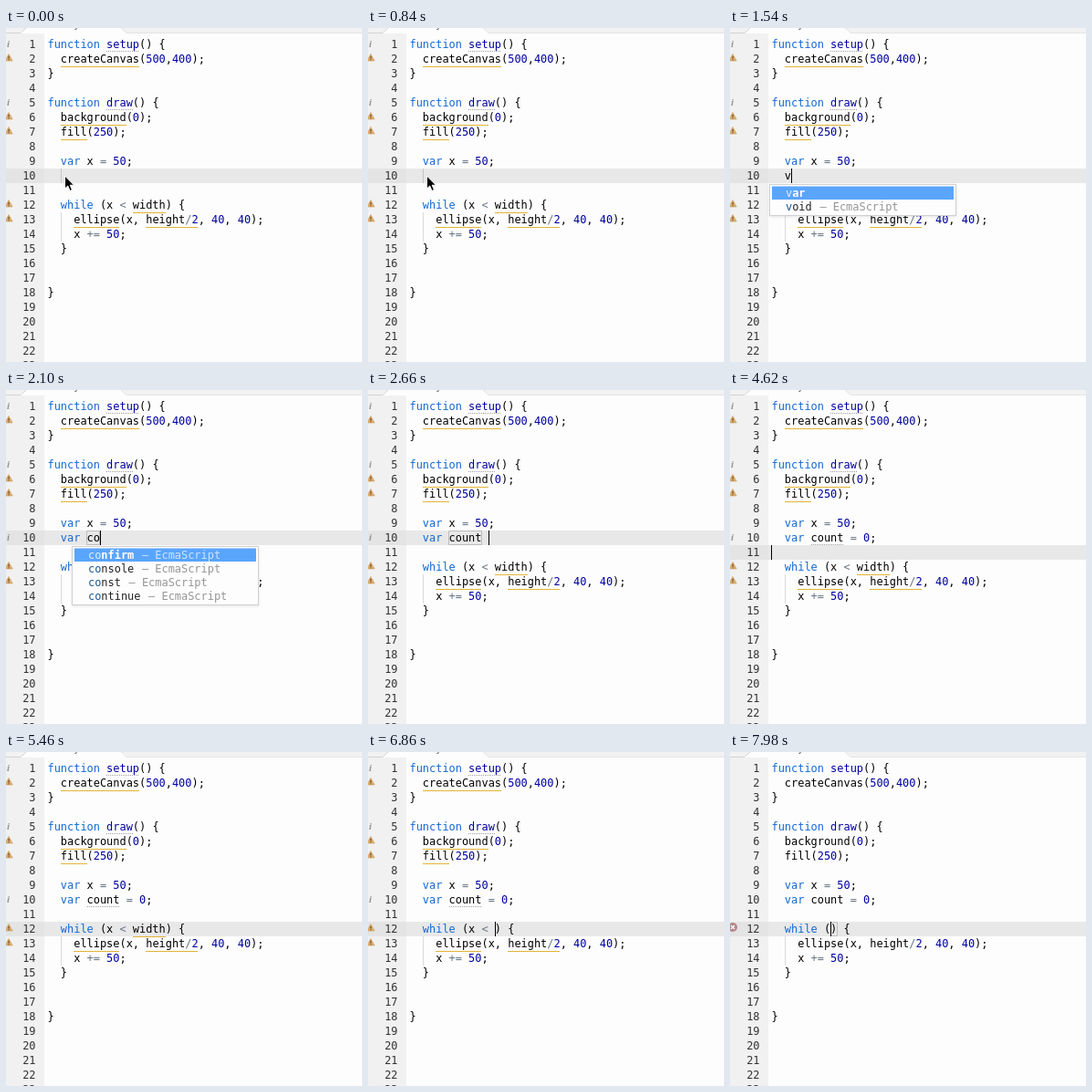
Animation of 390x366 px, one loop 8 s. Source, as an HTML page with a canvas:

```html
<!DOCTYPE html>
<html lang="en">
<head>
<meta charset="utf-8">
<title>Code editor</title>
<style>
  html, body { margin: 0; width: 100%; height: 100%; overflow: hidden; background: #fcfdfc; }
  canvas { display: block; width: 390px; height: 366px; }
</style>
</head>
<body>
<canvas id="stage"></canvas>
<script>
const W = 390, H = 366, LOOP = 8000;
const ADV = 7.18, LEFT = 45.5, TOP = 10, ROW = 16, GUTTER = 42;
const FONT = '11.93px "DejaVu Sans Mono", monospace';
const PAPER = '#fcfdfc';

const canvas = document.getElementById('stage');
const ctx = canvas.getContext('2d');
const ratio = window.devicePixelRatio || 1;
canvas.width = W * ratio;
canvas.height = H * ratio;

const code = [
  'function setup() {',
  '  createCanvas(500,400);',
  '}',
  '',
  'function draw() {',
  '  background(0);',
  '  fill(250);',
  '',
  '  var x = 50;',
  '',
  '',
  '',
  '    ellipse(x, height/2, 40, 40);',
  '    x += 50;',
  '  }',
  '', '',
  '}'
];

// Each step overrides part of the state from its time on.
const start = {
  line10: '  ', cond: 'x < width', row: 10, col: 2, caret: false,
  mouse: true, lint: true, info10: false, error: false,
  box: null, popup: null
};
const decl = (text, more) => ({ line10: '  ' + text, col: 2 + text.length, caret: true, popup: null, ...more });
const cond = (text, more) => ({ cond: text, col: 9 + text.length, caret: true, ...more });
const list = (col, match, items) => ({ col, match, items });
const boxed = n => [10, 6, n];

const steps = [
  [140, { caret: true }],
  [700, { caret: false }],
  [1120, { caret: true }],
  [1260, { caret: false }],
  [1540, decl('v', { mouse: false, popup: list(2, 1, ['var', 'void']) })],
  [1680, decl('va', { popup: list(2, 2, ['var']) })],
  [1820, decl('var ')],
  [1960, decl('var c', { popup: list(6, 1, ['case', 'catch', 'class', 'confirm', 'console', 'const', 'continue']) })],
  [2100, decl('var co', { info10: true, box: boxed(2), popup: list(6, 2, ['confirm', 'console', 'const', 'continue']) })],
  [2240, decl('var cou', { box: boxed(3), popup: list(6, 2, ['continue']) })],
  [2380, decl('var coun', { box: boxed(4) })],
  [2520, decl('var count', { box: boxed(5) })],
  [2660, decl('var count ')],
  [2800, decl('var count =')],
  [2940, decl('var count = ')],
  [3080, { lint: false, error: true }],
  [3360, decl('var count = 0')],
  [3500, { lint: true, error: false, box: null }],
  [3780, decl('var count = 0;')],
  [4340, { caret: false }],
  [4620, { row: 11, col: 0, caret: true }],
  [4900, { row: 12, col: 18 }],
  [5460, { caret: false }],
  [5880, { caret: true }],
  [6300, cond('x < widt')],
  [6580, cond('x < wi')],
  [6860, cond('x < ')],
  [7000, cond('x <')],
  [7140, cond('x ')],
  [7280, cond('x')],
  [7420, cond('')],
  [7560, { lint: false, error: true, box: [12, 9, 1] }]
];

const stateAt = t => steps.reduce((s, [at, patch]) => at <= t ? Object.assign(s, patch) : s, { ...start });

const rowTop = n => TOP + (n - 1) * ROW;
const colX = c => LEFT + c * ADV;
const caretX = c => Math.round(colX(c) - 0.1);

function rect(x, y, w, h, color) {
  ctx.fillStyle = color;
  ctx.fillRect(x, y, w, h);
}

function text(str, x, y, color) {
  ctx.fillStyle = color;
  ctx.fillText(str, x, y);
}

function path(points, fill, stroke, width = 1) {
  ctx.beginPath();
  points.forEach(([x, y]) => ctx.lineTo(x, y));
  if (fill) {
    ctx.closePath();
    ctx.fillStyle = fill;
    ctx.fill();
  }
  if (stroke) {
    ctx.strokeStyle = stroke;
    ctx.lineWidth = width;
    ctx.stroke();
  }
}

function tokenColor(tok) {
  if (/^(function|var|while)$/.test(tok)) return '#1268d4';
  if (/^(\d|setup$|draw$)/.test(tok)) return '#0000a2';
  if (/^[=+<\/]/.test(tok)) return '#687687';
  return '#000';
}

function codeLine(str, n) {
  for (const m of str.matchAll(/\w+|[=+<\/]+|[^\s\w=+<\/]+/g))
    text(m[0], colX(m.index), rowTop(n) + 12, tokenColor(m[0]));
}

function solidLine(n, col, len) {
  rect(Math.round(colX(col)), rowTop(n) + 16, Math.round(len * ADV), 1, '#e3b437');
}

function dottedLine(n, col, len) {
  const from = Math.round(colX(col));
  for (let x = from; x < from + len * ADV; x += 2) rect(x, rowTop(n) + 15, 1, 1, '#a0a0a0');
}

function infoIcon(n) {
  ctx.font = 'italic bold 11px "Liberation Serif", serif';
  text('i', 1, rowTop(n) + 11, '#959595');
  ctx.font = FONT;
}

function warnIcon(n) {
  const y = rowTop(n) + 2.5;
  path([[3, y], [7.2, y + 7.5], [-1.2, y + 7.5]], '#e0b070', '#c8985c', 0.6);
  rect(2.5, y + 2.3, 1.1, 2.8, '#604020');
  rect(2.5, y + 5.8, 1.1, 1.1, '#604020');
}

function errorIcon(n) {
  const y = rowTop(n) + 6;
  ctx.beginPath();
  ctx.arc(3, y, 5, 0, 7);
  ctx.fillStyle = '#b5858a';
  ctx.fill();
  path([[1, y - 2], [5, y + 2]], null, '#fff', 1.3);
  path([[5, y - 2], [1, y + 2]], null, '#fff', 1.3);
}

function topBar() {
  rect(0, 0, W, 5, '#f2f2f2');
  path([[16, 5], [22, 0], [126, 0], [132, 5]], PAPER);
  path([[0, 5.5], [16, 5.5], [22, 0]], null, '#d4d4d4');
  path([[126, 0], [132, 5.5], [W, 5.5]], null, '#e4e4e4');
  ctx.font = '11px "Open Sans", sans-serif';
  text('sketch.js', 40, -1, '#555');
  ctx.font = FONT;
}

function annotations(s) {
  if (s.error) errorIcon(12);
  if (!s.lint) return;
  [1, 5].forEach(infoIcon);
  [2, 6, 7, 12, 13].forEach(warnIcon);
  dottedLine(1, 9, 5);
  dottedLine(5, 9, 4);
  solidLine(2, 2, 12);
  solidLine(6, 2, 10);
  solidLine(7, 2, 4);
  solidLine(12, 13, Math.max(0, s.cond.length - 4));
  solidLine(13, 4, 7);
  solidLine(13, 15, 8);
  if (s.info10) {
    infoIcon(10);
    dottedLine(10, 6, Math.min(5, s.line10.length - 6));
  }
}

function popup({ col, match, items }) {
  const x = Math.round(colX(col) - 16.5), y = 171, h = items.length * 15 + 5;
  ctx.save();
  ctx.shadowColor = 'rgba(0,0,0,.1)';
  ctx.shadowBlur = 3 * ratio;
  ctx.shadowOffsetY = ratio;
  rect(x, y, 205, h, '#d0d0d0');
  ctx.restore();
  rect(x + 1, y + 1, 203, h - 2, '#fdfdfd');
  rect(x + 3, y + 2.5, 199, 14.5, '#5aa5fc');
  items.forEach((item, i) => {
    const tx = x + 18, ty = y + 14 + i * 15, on = i === 0;
    text(item.slice(0, match), tx, ty, on ? '#e4f0ff' : '#1a5590');
    if (on) ctx.font = 'bold ' + FONT;
    text(item.slice(match), tx + match * ADV, ty, on ? '#fff' : '#222');
    ctx.font = FONT;
    if (item !== 'var') text('– EcmaScript', tx + (item.length + 1) * ADV + 1.5, ty, on ? '#cfe4ff' : '#959595');
  });
}

function pointer(x, y) {
  const shape = [[0, 0], [0, 14], [3.2, 11], [5.6, 16.4], [8, 15.4], [5.7, 10.2], [10, 10.2]];
  ctx.lineJoin = 'round';
  path([...shape, shape[0]].map(([a, b]) => [x + a, y + b]), '#000', '#fff', 1);
}

function draw(t) {
  const s = stateAt(t);
  ctx.setTransform(ratio, 0, 0, ratio, 0, 0);
  ctx.font = FONT;
  ctx.textBaseline = 'alphabetic';
  rect(0, 0, W, H, PAPER);
  rect(0, 6, GUTTER, H, '#f1f1f1');
  topBar();

  rect(0, rowTop(s.row), GUTTER, ROW, '#e4e4e4');
  rect(GUTTER, rowTop(s.row), W, ROW, '#e8e8e8');

  for (let n = 1; n <= 23; n++) {
    const label = String(n);
    text(label, 32.5 - label.length * ADV, rowTop(n) + 12, '#333');
  }
  rect(60, rowTop(13), 1, ROW * 2, '#dadada');
  if (!s.line10.trim()) rect(60, rowTop(10), 1, ROW, '#c4c4c4');

  annotations(s);
  if (s.box) {
    const [n, col, len] = s.box;
    ctx.strokeStyle = '#bdbdbd';
    ctx.lineWidth = 1;
    ctx.strokeRect(Math.round(colX(col) - 0.5) + 0.5, rowTop(n) + 0.5, Math.round(len * ADV), ROW - 1);
  }

  code.forEach((str, i) => codeLine(str, i + 1));
  codeLine(s.line10, 10);
  codeLine(`  while (${s.cond}) {`, 12);

  if (s.caret) rect(caretX(s.col), rowTop(s.row), 1, ROW, '#000');
  if (s.popup) popup(s.popup);
  if (s.mouse) pointer(64.5, 162);
}

const origin = performance.now();
function tick() {
  draw((performance.now() - origin) % LOOP);
  requestAnimationFrame(tick);
}
tick();
</script>
</body>
</html>
```
